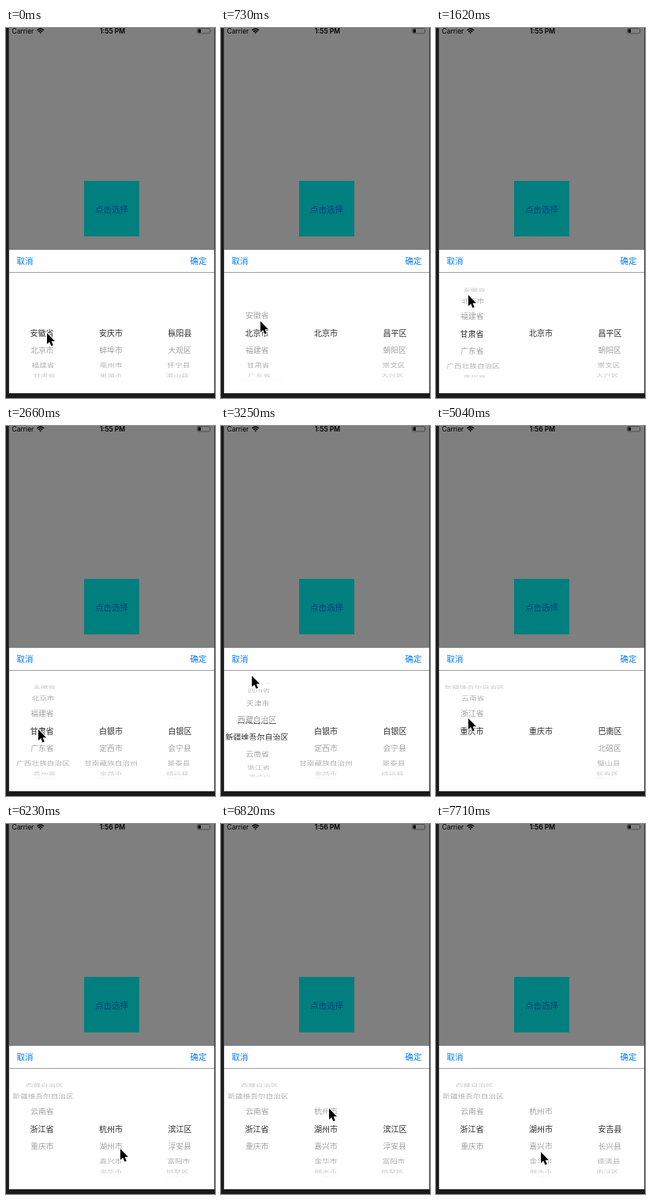
Recreate the animation shown at these times as an HTML page. Size 265 px wide and 467 px high, loop 8000 ms.

```html
<!DOCTYPE html>
<html lang="zh-CN">
<head>
<meta charset="utf-8">
<title>省市区选择器</title>
<style>
  html, body { margin: 0; width: 100%; height: 100%; overflow: hidden; background: #1b191b; }
  body { position: relative; font: 10px/14px "Noto Sans CJK SC", "Noto Sans CJK", sans-serif; }
  body * { position: absolute; }
  .screen { left: 3px; top: 0; width: 262px; height: 461px; background: #7f7f7f; }
  .bezel { left: 3px; top: 0; width: 260px; height: 461px; border: solid #3c3b3c; border-width: 0 1px; }
  .status { font: 8.5px/10px Inter, Roboto, sans-serif; color: #000; top: -1px; white-space: nowrap; }
  #clock { left: 75px; width: 114px; text-align: center; font-weight: 600; }
  .button { left: 96px; top: 193px; width: 70px; height: 70px; background: #007f7f;
            color: #003d7f; font-size: 10.5px; line-height: 71px; text-align: center; }
  .panel { left: 0; top: 280px; width: 262px; height: 181px; background: #fff; }
  .bar { left: 0; top: 0; width: 262px; height: 28px; border-bottom: 1px solid #a0a0a0;
         color: #007aff; font-size: 10.5px; line-height: 27px; }
  .bar span { white-space: nowrap; }
  #wheels { left: 0; top: 309px; width: 265px; height: 152px; overflow: hidden; }
  .band { left: 0; top: 64.5px; width: 265px; height: 22px; overflow: hidden; }
  .band::before { content: ""; position: absolute; inset: 0 0 0 3px; background: #fff; }
  .row { left: 0; top: 0; white-space: nowrap; color: #000; }
  .band .row { color: #2a2a2a; }
  svg { overflow: visible; }
</style>
</head>
<body>
<div class="screen">
  <span class="status" style="left:4.5px">Carrier</span>
  <svg style="left:36px;top:0" width="10" height="8" fill="none" stroke="#000" stroke-width="1.4">
    <path d="M.5 2.9Q4.7-1 8.9 2.9M2.2 4.7Q4.7 2.4 7.2 4.7"/>
    <path d="M3.3 5.8Q4.7 4.6 6.1 5.8L4.7 7.3Z" fill="#000" stroke="none"/>
  </svg>
  <span class="status" id="clock"></span>
  <svg style="left:239px;top:0" width="20" height="8">
    <rect x=".5" y=".5" width="16" height="6.4" rx="1.4" fill="none" stroke="#444" stroke-width=".8"/>
    <rect x="1.6" y="1.6" width="3.4" height="4.2" rx=".5"/>
    <path d="M17.6 2.5q1.1 1.2 0 2.4z" fill="#444"/>
  </svg>
  <div class="button">点击选择</div>
  <div class="panel">
    <div class="bar">
      <span style="left:10.5px">取消</span>
      <span style="right:10.5px">确定</span>
    </div>
  </div>
</div>
<div id="wheels"></div>
<div class="bezel"></div>
<svg id="cursor" style="left:0;top:1px" width="12" height="18">
  <path d="M0 0V14L3.2 11.1 5.4 16.2 7.8 15.2 5.6 10.2H10Z" stroke="#fff" stroke-width="1.8" paint-order="stroke" stroke-linejoin="round"/>
</svg>
<script>
const LOOP = 8000, TICK = 148.2;  // the screen refreshes once per tick
const ROW = 22, RADIUS = 60.7, ANGLE = 0.371, DEPTH = 900;
const MID_X = 133, MID_Y = 75, COLUMN = 87.5;
const list = s => s.split(' ');

const provinces = list('安徽省 北京市 福建省 甘肃省 广东省 广西壮族自治区 贵州省 海南省 河北省 河南省 黑龙江省 ' +
  '湖北省 湖南省 吉林省 江苏省 江西省 辽宁省 内蒙古自治区 宁夏回族自治区 青海省 山东省 山西省 陕西省 ' +
  '上海市 四川省 天津市 西藏自治区 新疆维吾尔自治区 云南省 浙江省 重庆市');
const zhejiang = list('杭州市 湖州市 嘉兴市 金华市 丽水市 宁波市');

// Lists loaded after each choice
const regions = [
  { from: 0, cities: list('安庆市 蚌埠市 亳州市 巢湖市 池州市'), districts: list('枞阳县 大观区 怀宁县 潜山县 宿松县') },
  { from: 5, cities: ['北京市'], districts: list('昌平区 朝阳区 崇文区 大兴区 东城区') },
  { from: 13, cities: list('白银市 定西市 甘南藏族自治州 金昌市 酒泉市'), districts: list('白银区 会宁县 景泰县 靖远县 平川区') },
  { from: 27, cities: ['重庆市'], districts: list('巴南区 北碚区 璧山县 长寿区 城口县') },
  { from: 37, cities: zhejiang, districts: list('滨江区 淳安县 富阳市 拱墅区 建德市') },
  { from: 49, cities: zhejiang, districts: list('安吉县 长兴县 德清县 南浔区 吴兴区') }
];

const smooth = f => f * f * (3 - 2 * f);
const coast = f => 1 - (1 - f) ** 3;

// Applies each move [start tick, end tick, ...goal] in turn
function glide(start, moves, ease, n) {
  return moves.reduce((now, [a, b, ...goal]) => {
    const f = ease(Math.min(1, Math.max(0, (n - a) / (b - a))));
    return now.map((v, i) => v + (goal[i] - v) * f);
  }, start);
}
const provinceAt = n => glide([0], [[0, 3, 1], [9, 12, 3], [18, 26, 30], [34, 37, 29]], coast, n)[0];
const cityAt = n => glide([0], [[44, 46, 1]], coast, n)[0];
const pointerAt = n => glide([52, 384], [
  [1, 3, 50, 369], [6, 8, 54, 388],
  [9, 11, 41, 336], [13, 18, 41, 382],
  [18, 20, 37, 301], [21, 25, 51, 386],
  [28, 34, 41, 368], [34, 36, 44, 405],
  [38, 42, 145, 409], [44, 46, 137, 358],
  [48, 52, 133, 413]
], smooth, n);

function add(parent, tag, cls) {
  const el = document.createElement(tag);
  el.className = cls;
  return parent.appendChild(el);
}

const wheels = document.getElementById('wheels');
const clock = document.getElementById('clock');
const cursor = document.getElementById('cursor');
const rows = (parent, count) => Array.from({ length: count }, () => add(parent, 'span', 'row'));

const drums = [0, 1, 2].map(() => rows(wheels, 9));
const band = add(wheels, 'div', 'band');
const flats = [0, 1, 2].map(() => rows(band, 3));

function place(el, text, x, y, sx, sy, alpha) {
  el.textContent = text || '';
  el.style.opacity = alpha;
  el.style.transform = `translate(${x}px,${y}px) translate(-50%,-50%) scale(${sx},${sy})`;
}

// A curved drum of grey rows, with flat dark rows in the middle band
function drawWheel(col, items, pos) {
  const x = (col - 1) * COLUMN, near = Math.round(pos);
  drums[col].forEach((el, k) => {
    const i = near + k - 4, a = (i - pos) * ANGLE, c = Math.max(0, Math.cos(a));
    const s = DEPTH / (DEPTH + RADIUS * (1 - c)), w = s * .985;
    place(el, items[i], MID_X + x * s, MID_Y + RADIUS * Math.sin(a), w, w * c, .4 * c ** .7);
  });
  flats[col].forEach((el, k) => {
    const i = near + k - 1;
    place(el, items[i], MID_X + x, MID_Y - 64.5 + (i - pos) * ROW, 1, 1, 1);
  });
}

function draw(n) {
  const region = regions.filter(r => r.from <= n).pop();
  drawWheel(0, provinces, provinceAt(n));
  drawWheel(1, region.cities, cityAt(n));
  drawWheel(2, region.districts, 0);
  const [x, y] = pointerAt(n);
  cursor.style.transform = `translate(${x}px,${y}px)`;
  clock.textContent = n < 31 ? '1:55 PM' : '1:56 PM';
}

let shown = -1;
function frame() {
  const n = Math.floor(performance.now() % LOOP / TICK + .11);
  if (n !== shown) draw(shown = n);
  requestAnimationFrame(frame);
}
frame();
</script>
</body>
</html>
```
